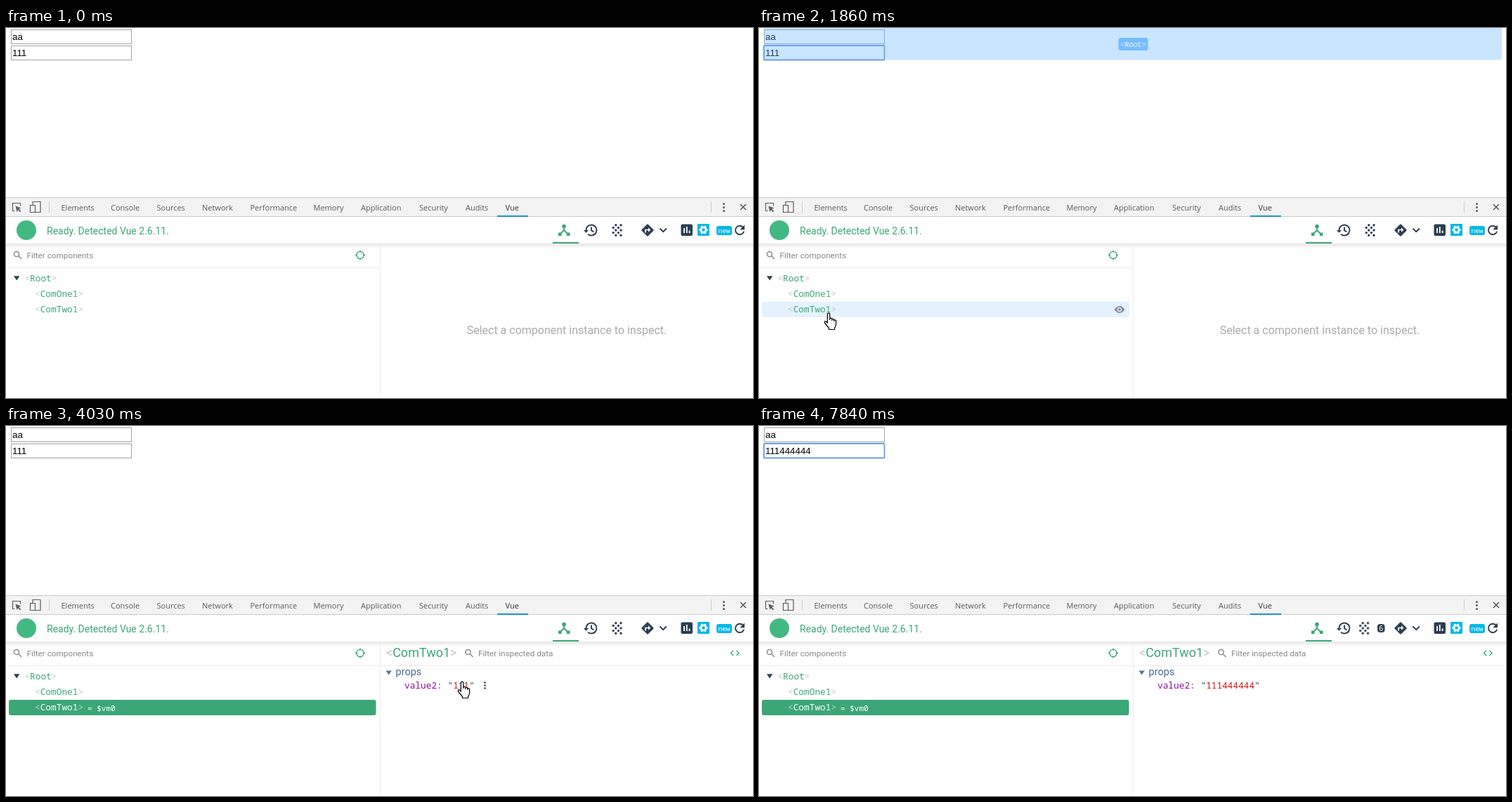
Recreate the animation shown at these times as an HTML page. Size 1063 by 527 pixels, loop 8000 ms.

```html
<!DOCTYPE html>
<html lang="en">
<head>
<meta charset="utf-8">
<title>Component inspector</title>
<style>
html, body { margin: 0; width: 100%; height: 100%; overflow: hidden; background: #fff; }
svg { display: block; }
text { font: 12px Roboto, sans-serif; }
.field { font: 13.333px "Liberation Sans", Arial, sans-serif; font-kerning: normal; }
.tabs text { font: 11px "Open Sans", sans-serif; fill: #5a5a5a; }
.hint { font-size: 11.75px; fill: #888; }
.mono, .tree text { font: 500 12.8px "Noto Sans Mono", monospace; white-space: pre; }
.tree text { fill: #3ba776; }
.tree .b, .b { fill: #c4c4c4; }
.tree .sel text { fill: #fff; }
.tree .sel .b { fill: #b9e0cd; }
.tip { font: 10px "Liberation Mono", monospace; fill: #fff; text-anchor: middle; }
.tip tspan { fill: #d5eaff; }
.green { stroke: #3ba776; }
.ink { fill: #2c3e50; }
.line { fill: none; stroke: #2c3e50; stroke-width: 1.9; }

/* one percent of the loop is 80 ms */
.a { animation: 8s step-end -20ms infinite; }
.typed { animation-name: typed; }
.late { animation-delay: -7940ms; }
#cursor { animation-name: move; }
#arrow { animation-name: arrow; }
#beam { animation-name: beam; }
#hand { animation-name: hand; }
#ring { animation-name: ring; }
#caret { animation-name: caret, typed; --x: 7.41px; }
#cover { --x: 7.41px; }
#quote { --x: 7.68px; }
#digits { --y: -12px; }
#overRoot { animation-name: overRoot; }
#overTwo { animation-name: overTwo; }
#rowRoot { animation-name: rowRoot; }
#rowTwo { animation-name: rowTwo; }
.before { animation-name: before; }
.after { animation-name: after; }
#more { animation-name: more; }
#grain { animation-name: grain; }
#badge { animation-name: badge; }

@keyframes move {
  1.875% { transform: translate(864px, 458px); animation-timing-function: steps(10); }
  11.5% { transform: translate(64.5px, 38px); }
  12.375% { transform: translate(64px, 38px); }
  14.5% { transform: translate(54px, 41px); }
  17.375% { transform: translate(69px, 33px); }
  19.25% { transform: translate(80px, 70px); }
  20.25% { transform: translate(100px, 180px); }
  21.375% { transform: translate(118px, 287px); }
  22.25% { transform: translate(112px, 355px); }
  23.25% { transform: translate(99px, 406px); }
  24.25% { transform: translate(95px, 411px); animation-timing-function: steps(5); }
  29% { transform: translate(92px, 408px); }
  30% { transform: translate(94px, 406px); }
  31.125% { transform: translate(96px, 404px); }
  35% { transform: translate(95px, 403px); }
  38.75% { transform: translate(98px, 411px); }
  40.875% { transform: translate(140px, 427px); animation-timing-function: steps(5); }
  45.675% { transform: translate(480px, 425px); animation-timing-function: steps(5); }
  50.375% { transform: translate(649px, 364px); }
  54.5% { transform: translate(590px, 335px); animation-timing-function: steps(4); }
  58.375% { transform: translate(400px, 240px); animation-timing-function: steps(4); }
  62.25% { transform: translate(4px, 70px); animation-timing-function: steps(2); }
  64.25% { transform: translate(47px, 39px); }
  66.125% { transform: translate(47px, 42px); }
  68% { transform: translate(53px, 38px); }
  69% { transform: translate(37px, 35px); }
  70%, 100% { transform: translate(49.5px, 32px); }
}
@keyframes arrow {
  0%, 11.5%, 22.25%, 50.375%, 64.25%, 100% { opacity: 0; }
  1.875%, 19.25%, 40.875%, 54.5% { opacity: 1; }
}
@keyframes beam { 0%, 19.25%, 98%, 100% { opacity: 0; } 11.5%, 64.25% { opacity: 1; } }
@keyframes hand { 0%, 40.875%, 54.5%, 100% { opacity: 0; } 22.25%, 50.375% { opacity: 1; } }
@keyframes ring { 0%, 37% { opacity: 0; } 14.5%, 66.125% { opacity: 1; } }
@keyframes caret {
  0%, 21.125%, 34%, 72.75%, 96.125%, 100% { opacity: 0; }
  14.5%, 27.5%, 66.125%, 78.75% { opacity: 1; }
}
@keyframes typed {
  0% { transform: none; }
  78.75% { transform: translate(var(--x, 0px), var(--y, 0px)); animation-timing-function: steps(5); }
  89.375%, 100% { transform: translate(calc(6 * var(--x, 0px)), calc(6 * var(--y, 0px))); }
}
@keyframes overRoot { 0%, 24.25%, 100% { opacity: 0; } 23.25% { opacity: 1; } }
@keyframes overTwo { 0%, 40.875%, 100% { opacity: 0; } 24.25% { opacity: 1; } }
@keyframes rowRoot { 0%, 23.25%, 100% { opacity: 0; } 22.25% { opacity: 1; } }
@keyframes rowTwo { 0%, 38.75%, 100% { opacity: 0; } 23.25% { opacity: 1; } }
@keyframes before { 0% { opacity: 1; } 38.75%, 100% { opacity: 0; } }
@keyframes after { 0% { opacity: 0; } 38.75%, 100% { opacity: 1; } }
@keyframes more { 0%, 54.5%, 100% { opacity: 0; } 49.4% { opacity: 1; } }
@keyframes grain { 0% { transform: none; } 79.75%, 100% { transform: translateX(-8.5px); } }
@keyframes badge { 0% { opacity: 0; } 79.75%, 100% { opacity: 1; } }
</style>
</head>
<body>
<svg width="1063" height="527" viewBox="0 0 1063 527">
  <defs>
    <linearGradient id="shade" x2="0" y2="1">
      <stop stop-color="#000" stop-opacity=".1"/>
      <stop offset="1" stop-color="#000" stop-opacity="0"/>
    </linearGradient>
    <g id="lens" fill="none" stroke="#888" stroke-width="1.5">
      <circle r="3.6"/><path d="M2.8 2.8 7 7"/>
    </g>
    <g id="hover">
      <rect x="4" width="523" height="22" rx="3" fill="#e4f2ff"/>
      <path d="M505.500 11Q513 1 520.500 11Q513 21 505.500 11Z" fill="#8a8f94"/>
      <circle cx="513" cy="11" r="3.200" fill="#e4f2ff"/>
      <circle cx="513" cy="11" r="1.900" fill="#8a8f94"/>
    </g>
  </defs>

  <!-- page -->
  <g fill="#fff" stroke="#a3a3a3">
    <rect x="7.500" y="2.500" width="171" height="20"/>
    <rect x="7.500" y="25.500" width="171" height="20"/>
  </g>
  <text class="field" x="9" y="17">aa</text>
  <text class="field" x="9" y="40">111444444</text>
  <rect id="cover" class="a typed" x="29" y="28" width="60" height="16" fill="#fff"/>
  <path id="caret" class="a" d="M29.500 28v15" stroke="#000"/>
  <rect id="ring" class="a" x="7" y="25" width="171.500" height="20.500" rx="1" fill="none" stroke="#6c9ce6" stroke-width="1.800"/>
  <g id="overRoot" class="a">
    <rect x="7" y="-4" width="1050" height="49.500" rx="4" fill="#68b6ff" opacity=".35"/>
    <rect x="511.500" y="14" width="42" height="18" rx="3" fill="#76bcff"/>
    <text class="tip" x="532.500" y="27"><tspan>&lt;</tspan>Root<tspan>&gt;</tspan></text>
  </g>
  <g id="overTwo" class="a">
    <rect x="7" y="23" width="1050" height="22.500" rx="3" fill="#68b6ff" opacity=".35"/>
    <rect x="502.500" y="26" width="60" height="18" rx="3" fill="#76bcff"/>
    <text class="tip" x="532.500" y="38.500"><tspan>&lt;</tspan>ComTwo1<tspan>&gt;</tspan></text>
  </g>

  <!-- tab bar -->
  <rect y="241" width="1063" height="28" fill="#f3f3f3"/>
  <path d="M0 241.500h1063M0 268.500h1063M61.500 247v16M1003.500 247v16" stroke="#ccc"/>
  <g class="tabs">
    <text x="78.500" y="260">Elements</text>
    <text x="149" y="260">Console</text>
    <text x="214.500" y="260">Sources</text>
    <text x="279" y="260">Network</text>
    <text x="347.500" y="260">Performance</text>
    <text x="437.500" y="260">Memory</text>
    <text x="505" y="260">Application</text>
    <text x="588" y="260">Security</text>
    <text x="654" y="260">Audits</text>
    <text x="710.500" y="260" style="fill:#333">Vue</text>
  </g>
  <path d="M699 268h44" stroke="#1d93cc" stroke-width="2"/>
  <g fill="none" stroke="#5a5a5a" stroke-width="1.200">
    <path d="M12.500 260.500h-3v-11h11v4"/>
    <path d="M13.500 253.500l8 3-3.200 1.300 3 3.200-1.200 1.200-3.200-3-1.300 3z" fill="#5a5a5a" stroke="none"/>
    <path d="M38 252v-4.500h11v15h-7M34.500 252.500h7v10h-7z"/>
    <path d="M1045 251l8 8m0-8-8 8" stroke-width="1.600"/>
    <path d="M1021.500 250.500v11" stroke-width="3" stroke-linecap="round" stroke-dasharray="0 5"/>
  </g>

  <!-- header -->
  <rect y="307" width="1063" height="7" fill="url(#shade)"/>
  <circle cx="29" cy="288" r="14" fill="#42b983"/>
  <text x="58" y="294" style="font-size:14px" fill="#3ba776">Ready. Detected Vue 2.6.11.</text>
  <path d="M778 306h37" class="green" stroke-width="2"/>
  <g class="green" stroke-width="1.900" fill="#3ba776">
    <path d="M794 283v5l-5.500 5.500M794 288l5.500 5.500" fill="none"/>
    <circle cx="794" cy="282.500" r="2.800" stroke="none"/>
    <path d="M786 291.500h4.600v4.600h-4.600zM797.900 291.500h4.600v4.600h-4.600z" stroke="none"/>
  </g>
  <path class="line" d="M825.500 288a7.500 7.500 0 1 1 2.500 5.600M833 283.500v4.800l3.500 2.200"/>
  <path class="ink" d="M822 288h7l-3.500 3.800z"/>
  <g id="grain" class="a">
    <path d="M867.800 280.800h7.400M864.200 284.400h7.300M867.800 288h7.400M864.200 291.600h7.300M867.800 295.200h7.400"
      class="line" style="stroke-width:3.400" stroke-linecap="round" stroke-dasharray="0 7.200"/>
  </g>
  <g id="badge" class="a">
    <rect class="ink" x="880" y="282" width="10.500" height="12" rx="4"/>
    <svg x="880" y="282" width="10.500" height="12" overflow="hidden">
      <g id="digits" class="a typed late" fill="#fff" text-anchor="middle">
        <g style="font-weight:bold">
          <text class="mono" style="font-size:10px" x="5.200" y="21.500">1</text>
          <text class="mono" style="font-size:10px" x="5.200" y="33.500">2</text>
          <text class="mono" style="font-size:10px" x="5.200" y="45.500">3</text>
          <text class="mono" style="font-size:10px" x="5.200" y="57.500">4</text>
          <text class="mono" style="font-size:10px" x="5.200" y="69.500">5</text>
          <text class="mono" style="font-size:10px" x="5.200" y="81.500">6</text>
        </g>
      </g>
    </svg>
  </g>
  <rect class="ink" x="906.500" y="281.500" width="13" height="13" rx="1.200" transform="rotate(45 913 288)"/>
  <path d="M910 291.500v-4h4" fill="none" stroke="#fff" stroke-width="1.700"/>
  <path d="M914 284.300l3.400 3.200-3.400 3.200z" fill="#fff"/>
  <path class="line" d="M930.500 285.500l4.700 4.700 4.700-4.700"/>
  <rect class="ink" x="960.500" y="279.500" width="16.500" height="16.500" rx="2"/>
  <path d="M965 285v7M968.800 283v9M972.600 288.500v3.500" stroke="#fff" stroke-width="1.800"/>
  <rect x="984" y="279" width="17" height="17" rx="1" fill="#06b8e6"/>
  <g fill="none" stroke="#fff" transform="translate(992.500 287.500)">
    <circle r="3.600" stroke-width="2.600"/>
    <circle r="5.200" stroke-width="1.800" pathLength="12" stroke-dasharray="1" stroke-dashoffset=".5"/>
  </g>
  <rect x="1011" y="282" width="22" height="13" rx="3" fill="#06b8e6"/>
  <text class="mono" style="font-size:9.500px" x="1022" y="292" text-anchor="middle" fill="#fff">new</text>
  <path class="line" d="M1048.800 283.800a6.200 6.200 0 1 0 1.300 6"/>
  <path class="ink" d="M1051 280.500v6.700h-6.700z"/>

  <!-- component tree -->
  <path d="M0 341.500h532M532.500 308v219" stroke="#eee"/>
  <use href="#lens" x="15" y="322"/>
  <text class="hint" x="29.500" y="327.500">Filter components</text>
  <g class="green" fill="none" stroke-width="1.300">
    <circle cx="504" cy="323.500" r="5.200"/>
    <path d="M504 316.500v3M504 327.500v3M497 323.500h3M508 323.500h3"/>
  </g>
  <g class="tree">
    <g id="rowRoot" class="a"><use href="#hover" y="346"/></g>
    <g id="rowTwo" class="a"><use href="#hover" y="390"/></g>
    <path class="ink" d="M11 353.300h8.400l-4.200 6.200z"/>
    <text x="26.400" y="361"><tspan class="b">&lt;</tspan>Root<tspan class="b">&gt;</tspan></text>
    <text x="41" y="383"><tspan class="b">&lt;</tspan>ComOne1<tspan class="b">&gt;</tspan></text>
    <text class="a before" x="41" y="405"><tspan class="b">&lt;</tspan>ComTwo1<tspan class="b">&gt;</tspan></text>
    <g class="sel a after">
      <rect x="4" y="390" width="522.500" height="22" rx="3" fill="#3ba776"/>
      <text x="41" y="405"><tspan class="b">&lt;</tspan>ComTwo1<tspan class="b">&gt;</tspan></text>
      <text x="116" y="405.500" style="font-size:11px">= $vm0</text>
    </g>
  </g>

  <!-- inspector -->
  <text class="a before" x="798" y="436" text-anchor="middle" style="font-size:16px" fill="#aaa">Select a component instance to inspect.</text>
  <g class="a after">
    <path d="M533 341.500h530" stroke="#eee"/>
    <text x="541" y="329" style="font-size:18px" fill="#3ba776"><tspan class="b">&lt;</tspan>ComTwo1<tspan class="b">&gt;</tspan></text>
    <use href="#lens" x="657.500" y="322"/>
    <text class="hint" x="672" y="327.500">Filter inspected data</text>
    <path class="green" d="M1035 320l-3.500 3.500 3.500 3.500M1039.500 320l3.500 3.500-3.500 3.500" fill="none" stroke-width="1.400"/>
    <path d="M540.500 348.500h8.400l-4.200 6z" fill="#5b7590"/>
    <text x="554.500" y="355" style="font-size:14.500px" fill="#486887">props</text>
    <text class="mono" x="567" y="374" fill="#444" style="font-weight:400"><tspan fill="#881391">value2</tspan>: "<tspan fill="#c41a16">111444444</tspan></text>
    <g id="quote" class="a typed late">
      <rect x="659.200" y="362" width="60" height="16" fill="#fff"/>
      <text class="mono" x="659.200" y="374" fill="#444" style="font-weight:400">"</text>
    </g>
  </g>
  <path id="more" class="a" d="M681.500 365.500v9" stroke="#333" stroke-width="2.600" stroke-linecap="round" stroke-dasharray="0 4"/>

  <!-- pointer -->
  <g id="cursor" class="a" fill="#fff" stroke="#000" stroke-linejoin="round">
    <path id="arrow" class="a" d="M0 0v15.500l3.600-3.300 2.700 6 2.300-1-2.700-5.800h5z"/>
    <path id="beam" class="a" d="M-3.500-7h2.500L0-6.300 1-7h2.500M-3.500 7h2.500L0 6.300 1 7h2.500M0-6.500v13" fill="none" stroke-width="1.500"/>
    <path id="hand" class="a" stroke-width="1.200" d="M-1.600 14V1.800a1.700 1.700 0 0 1 3.400 0V9.500V8.500a1.500 1.500 0 0 1 3 .4v1.600V9.600a1.500 1.500 0 0 1 3 .5v1.400V11a1.400 1.400 0 0 1 2.800.4V16q0 3-2 5v2.500H.5v-2L-5.600 14q-.6-2.400 1.300-2.500z"/>
  </g>
</svg>
</body>
</html>
```
